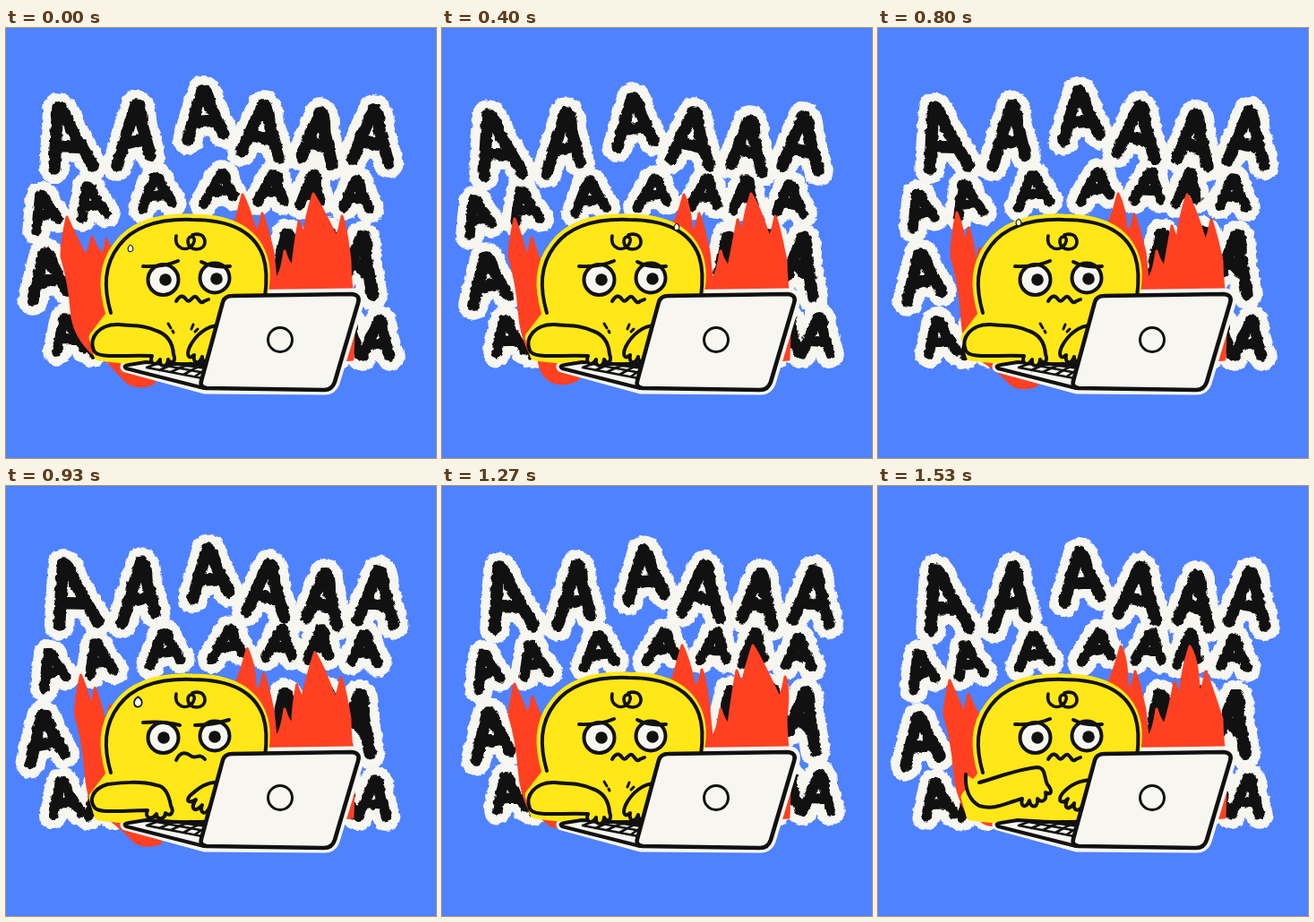
An HTML page that plays this animation: 480x480 px, repeating every 1590 ms.

```html
<!DOCTYPE html>
<html lang="en">
<head>
<meta charset="utf-8">
<title>Screaming at the laptop</title>
<style>
html, body { margin: 0; width: 100%; height: 100%; overflow: hidden; background: #4f82ff; }
svg { display: block; width: 100vw; height: 100vh; }
.ink { fill: none; stroke: #111; stroke-width: 4; stroke-linecap: round; stroke-linejoin: round; }
.skin { fill: #ffe718; }
.paper { fill: #f7f6f0; }
.fire { fill: #ff4122; stroke: #ff4122; stroke-width: 3; stroke-linejoin: round; }
.letters { fill: none; stroke-linecap: round; stroke-linejoin: round; }
</style>
</head>
<body>
<svg viewBox="0 0 480 480" role="img" aria-label="AAAAAA">
  <defs>
    <filter id="rough" filterUnits="userSpaceOnUse" x="0" y="0" width="480" height="480" color-interpolation-filters="sRGB">
      <feTurbulence type="fractalNoise" baseFrequency="0.16" numOctaves="2" seed="4"/>
      <feDisplacementMap in="SourceGraphic" scale="5" xChannelSelector="R" yChannelSelector="G"/>
    </filter>
  </defs>
  <rect width="480" height="480" fill="#4f82ff"/>
  <g class="letters" filter="url(#rough)">
    <g id="halo" stroke="#f7f6f0"></g>
    <g id="black" stroke="#111"></g>
  </g>
  <path id="fireL" class="fire"/>
  <path id="fireR" class="fire"/>
  <path id="fireB" class="fire"/>

  <path class="paper" stroke="#f7f6f0" stroke-width="13" stroke-linejoin="round"
    d="M134 378L154 374L222 376L246 299L388 297Q395 298 393 307L366 396Q363 403 356 403L222 402Z"/>
  <g id="head">
    <path class="skin" stroke="#ffe718" stroke-width="11" stroke-linejoin="round"
      d="M117 320C108 290 108 265 125 243C145 216 180 212 208 213C250 213 276 227 286 255C291 270 290 285 286 300L246 302L222 370L140 370L104 366L98 345Z"/>
    <path class="ink" d="M117 318C109 290 109 265 126 243C146 217 180 213 208 214C250 214 277 227 287 255C292 270 291 285 289 300"/>
  </g>
  <path class="ink" style="stroke-width:3.6" d="M190 232C187 247 203 251 209 241C214 232 203 230 203 238C203 250 223 250 222 238C221 230 214 229 208 231"/>
  <g id="eyes">
    <circle class="ink" cx="175.500" cy="281" r="17" style="fill:#f7f6f0"/>
    <circle class="ink" cx="233" cy="279" r="16.500" style="fill:#f7f6f0"/>
    <g id="pupils" fill="#111"><circle cx="178" cy="281" r="6.800"/><circle cx="235" cy="280" r="6.800"/></g>
  </g>
  <path id="brows" class="ink"/>
  <path id="mouth" class="ink"/>
  <path id="drop" class="ink" d="M0 -7C3 -5 6 -1 5 3C3 8 -4 8 -5 3C-6 -1 -3 -5 0 -7Z" style="fill:#f7f6f0;stroke-width:2"/>
  <path id="marks" class="ink" style="stroke-width:3" d="M181 330l3 5M186 338l1 2M209 331l-2 5M214 336l-3 3"/>

  <path class="ink" style="fill:#f7f6f0" d="M221 402L134 380Q130 377 137 376L156 373L224 377"/>
  <path class="ink" style="stroke-width:2.600" d="M157 379L168 375L224 374M157 379L219 391M168 375L222 385M180 374L224 380M171 382L190 374M184 384L206 374M198 387L220 375M211 389L224 380"/>
  <g id="arms"></g>

  <path class="paper ink" style="fill:#f7f6f0;stroke-width:4.600" d="M253 299L386 297Q396 298 393 307L367 395Q364 404 355 404L224 402Q216 401 218 394L242 306Q244 299 253 299Z"/>
  <circle class="ink" cx="306" cy="348" r="13.500" style="stroke-width:3"/>
</svg>
<script>
const $ = id => document.getElementById(id);
const LOOP = 1590, STEPS = 24;
const KEYS = [0, 3, 6, 12, 16, 19, 23];

// letters: left foot, apex, right foot; shifts: dx, dy at left end, dy at right end
const ROWS = [
  { w: 13.5, a: [[54,157,59,89,97,154], [124,154,146,86,161,142], [203,125,220,70,243,118],
      [263,138,288,86,305,145], [330,144,351,95,364,153], [387,146,411,91,427,151]],
    move: [[0,0,0], [7,0,2], [-7,8,8], [4,0,2], [7,0,1], [5,2,3], [5,4,5]] },
  { w: 11.5, a: [[34,226,39,187,58,213], [85,212,91,177,112,207], [152,202,167,166,186,195],
      [221,196,241,163,254,188], [281,194,299,163,310,193], [328,198,343,164,351,193], [377,200,391,170,406,202]],
    move: [[0,0,0], [11,-2,-2], [-3,5,5], [5,-2,-2], [10,-2,-3], [7,1,0], [6,1,1]] },
  { w: 13.5, a: [[30,304,44,251,68,293], [304,275,314,230,330,270], [346,280,360,228,378,275], [381,273,398,232,409,298]],
    move: [[0,0,0], [-7,12,0], [5,5,2], [3,1,-1], [-6,10,-2], [8,2,-2], [1,8,1]] },
  { w: 11.5, a: [[57,361,66,324,88,358], [97,363,108,326,124,362], [368,368,382,326,394,365], [398,367,417,326,429,367]],
    move: [[0,0,0], [-9,8,5], [4,2,-3], [0,3,0], [-9,6,4], [5,1,-4], [-3,8,0]] }
];

// flame tips
const TIPS = {
  l1: [[68,211], [67,224], [81,213], [88,206], [84,215], [81,221], [80,217]],
  l2: [[96,233], [97,234], [100,234], [101,223], [101,228], [101,235], [101,232]],
  l3: [[112,236], [117,236], [116,248], [113,246], [117,240], [118,246], [121,243]],
  r1: [[264,186], [263,191], [270,186], [268,185], [268,181], [268,178], [271,179]],
  r2: [[286,207], [288,209], [287,207], [286,208], [287,206], [290,205], [287,207]],
  r3: [[327,216], [330,219], [330,214], [328,221], [326,223], [329,206], [331,219]],
  r4: [[343,185], [345,188], [345,185], [345,186], [343,181], [347,178], [348,179]],
  r5: [[375,210], [372,214], [372,210], [372,214], [378,212], [383,213], [366,207]],
  b: [[152,400], [148,401], [136,397], [165,402], [158,397], [150,384], [150,380]]
};

// start, end, then the path from and to
const DROPS = [[0,4,139,246,139,281], [6,9,262,222,276,246], [12,17,157,217,133,277]];

const ARMS = [
  ["M126 331C104 330 92 346 98 360C102 369 125 365 163 366C160 374 166 379 172 370C171 379 180 380 181 370C185 377 190 372 187 364C186 352 180 342 168 338C154 331 140 333 126 331",
   "M238 332C225 332 212 342 205 356C201 365 204 371 210 365C208 375 216 376 219 367C219 375 227 374 228 365"],
  ["M113 333C97 338 92 350 99 359C104 366 130 362 158 362C154 370 162 374 168 366C168 373 177 373 178 365C184 370 188 364 184 357C182 345 178 335 168 334C150 329 130 331 113 333",
   "M240 331C225 329 215 337 205 346C200 353 206 354 212 350C205 360 211 366 219 356C215 366 224 368 227 359"],
  ["M113 331C135 325 155 316 178 314C188 315 185 326 189 333C195 340 194 346 187 342C189 352 182 354 178 349C179 360 170 360 169 351C166 360 158 359 161 349C140 355 130 362 113 357C102 351 97 338 98 322",
   "M240 328C224 328 214 334 206 343C199 352 206 356 212 349C206 360 213 363 219 354C217 364 226 364 229 355"]
];

const rnd = n => { const v = Math.sin(n * 127.1 + 3.7) * 43758.5453; return v - Math.floor(v); };
const mix = (a, b, u) => a + (b - a) * u;

// value of a track at step k, with a little shake away from the keys
function at(track, k, seed, shake) {
  let i = KEYS.length - 1;
  while (KEYS[i] > k) i--;
  const j = (i + 1) % KEYS.length;
  const u = (k - KEYS[i]) / ((KEYS[j] || STEPS) - KEYS[i]);
  return track[i].map((v, c) => mix(v, track[j][c], u) + (u ? (rnd(seed + k * 7 + c) - 0.5) * shake : 0));
}

function letter([lx, ly, ax, ay, rx, ry]) {
  const side = (x, y, u) => `${mix(ax, x, u)} ${mix(ay, y, u)}`;
  return `M${lx} ${ly}Q${mix(lx, ax, 0.5) - 1} ${mix(ly, ay, 0.5)} ${ax - 1} ${ay}` +
    `Q${ax + 5} ${ay - 1} ${side(rx, ry, 0.35)}L${rx} ${ry}M${side(lx, ly, 0.64)}L${side(rx, ry, 0.68)}`;
}

function drawText(k) {
  ROWS.forEach((row, i) => {
    const [dx, dl, dr] = at(row.move, k, i * 31, 5);
    const d = row.a.map(p => {
      const dy = mix(dl, dr, (p[2] - 50) / 360);
      return letter(p.map((v, c) => v + (c % 2 ? dy : dx)));
    }).join("");
    row.halo.setAttribute("d", d);
    row.ink.setAttribute("d", d);
  });
}

// a pointed lick up to a tip and down into the next valley
const lick = ([x, y], w, vx, vy) =>
  `Q${x - w} ${y + 28} ${x} ${y}Q${x + w} ${y + 14} ${vx} ${vy}`;

function drawFire(k) {
  const t = {};
  Object.keys(TIPS).forEach((n, i) => t[n] = at(TIPS[n], k, 200 + i * 17, 6));
  const { l1, l2, l3, r1, r2, r3, r4, r5, b } = t;
  const edge = l1[0] - 7;
  $("fireL").setAttribute("d", `M150 370L100 366Q${edge + 14} 345 ${edge + 12} 315Q${edge + 10} 285 ${edge + 1} 255` +
    lick(l1, 6, mix(l1[0], l2[0], 0.6), l2[1] + 14) +
    lick(l2, 5, mix(l2[0], l3[0], 0.6), l3[1] + 14) +
    lick(l3, 4, 135, l3[1] + 30) + "Z");
  $("fireR").setAttribute("d", "M245 310L252 232" +
    lick(r1, 7, r2[0] - 9, r2[1] + 14) +
    lick(r2, 5, 298, 250) + "L301 280" +
    lick([311, 249], 4, 320, 266) +
    lick(r3, 5, r3[0] + 6, r3[1] + 16) +
    lick(r4, 9, r5[0] - 8, r5[1] + 20) +
    lick(r5, 5, 384, 260) + "Q384 285 389 310L387 370L250 380Z");
  $("fireB").setAttribute("d", `M108 366Q${b[0] - 28} 384 ${b[0] - 16} ${b[1] - 4}` +
    `Q${b[0] - 4} ${b[1] + 3} ${b[0] + 12} ${b[1] - 3}L180 372Z`);
}

function drawFace(pose) {
  const mid = pose === 1;
  $("head").setAttribute("transform", `translate(0 ${pose ? 2 : 0})`);
  $("pupils").setAttribute("transform", mid ? "translate(-2 0)" : "");
  $("brows").setAttribute("d", mid
    ? "M153 264Q176 262 194 267M211 267Q230 267 249 261"
    : "M153 266Q176 267 192 260M218 261Q231 268 250 266");
  $("mouth").setAttribute("d", mid
    ? "M190 306C195 295 202 298 206 301C212 306 215 297 222 305"
    : "M190 305C194 298 198 298 201 303C205 309 208 298 212 300C216 303 217 309 221 305L226 303");
  $("marks").style.display = pose ? "none" : "";
  ARMS[pose].forEach((d, i) => $("arms").children[i].setAttribute("d", d));
}

function drawDrop(k) {
  const run = DROPS.find(r => k >= r[0] && k <= r[1]);
  $("drop").style.display = run ? "" : "none";
  if (!run) return;
  const [a, b, x0, y0, x1, y1] = run, u = (k - a) / (b - a);
  $("drop").setAttribute("transform",
    `translate(${mix(x0, x1, u)} ${mix(y0, y1, u)}) scale(${Math.min(1, 0.55 + u * 0.7)})`);
}

function add(parent, attrs) {
  const p = document.createElementNS("http://www.w3.org/2000/svg", "path");
  for (const n in attrs) p.setAttribute(n, attrs[n]);
  return parent.appendChild(p);
}

ROWS.forEach(row => {
  row.halo = add($("halo"), { "stroke-width": row.w + 20 });
  row.ink = add($("black"), { "stroke-width": row.w });
});
for (let i = 0; i < 2; i++) add($("arms"), { class: "ink", style: "fill:#ffe718" });

const start = k => Math.round(k * 20 / 3) * 10;
let shown = -1;

function draw(ms) {
  const t = ms % LOOP;
  let k = 0;
  while (k < STEPS - 1 && start(k + 1) <= t) k++;
  if (k === shown) return;
  shown = k;
  drawText(k);
  drawFire(k);
  drawFace(Math.floor(k % 6 / 2));
  drawDrop(k);
}

const t0 = performance.now();
function tick() {
  draw(performance.now() - t0);
  requestAnimationFrame(tick);
}
tick();
</script>
</body>
</html>
```
